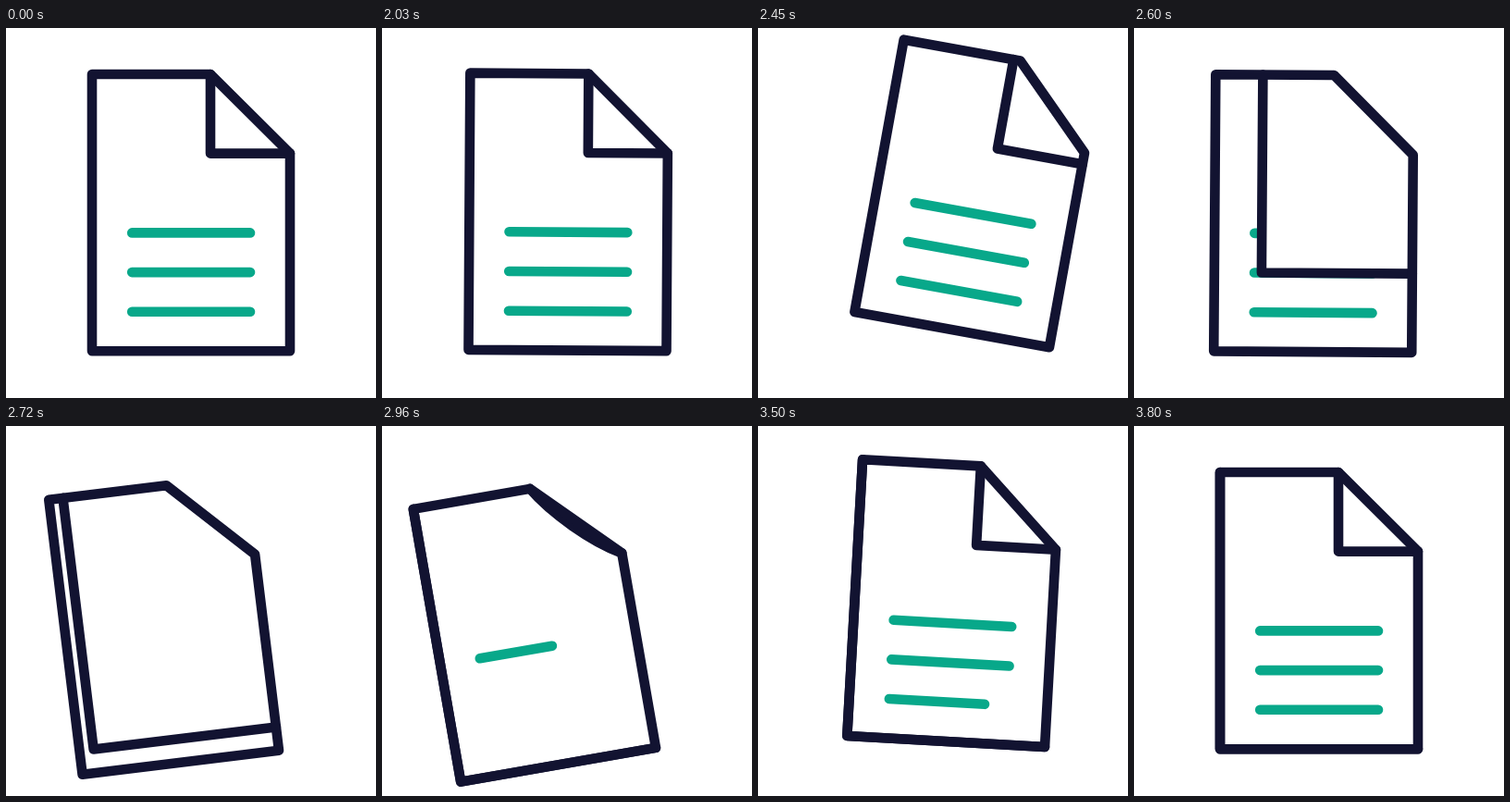
An HTML page with a canvas for the animation above (3.89 s loop, 400 by 400 pixels).

```html
<!DOCTYPE html>
<html lang="en">
<head>
<meta charset="utf-8">
<title>Document</title>
<style>
  html, body { margin: 0; width: 100%; height: 100%; overflow: hidden; background: #fff; }
  canvas { display: block; width: 400px; height: 400px; }
</style>
</head>
<body>
<canvas id="stage"></canvas>
<script>
const LOOP = 3890, STEP = 30, MOVE_START = 2030;
const NAVY = '#121331', TEAL = '#08a88a';
const LEFT = 93, RIGHT = 307, TOP = 50, BOTTOM = 349.2;
const CUT_X = 221, CUT_Y = 135.6;
const LINES = [221.4, 264.1, 306.8], LINE_X = 136.2, LINE_W = 127.8;
const LINES_START = 2745, LINE_GAP = 220, LINE_TIME = 560;

const canvas = document.getElementById('stage');
const ratio = window.devicePixelRatio || 1;
canvas.width = canvas.height = 400 * ratio;
const ctx = canvas.getContext('2d');

const mix = (a, b, u) => a + (b - a) * u;
const span = (t, start, length) => Math.min(1, Math.max(0, (t - start) / length));
const smooth = u => u * u * (3 - 2 * u);
const easeOut = u => 1 - (1 - u) ** 2;

// cubic-bezier(.3, 0, .3, 1)
function snap(x) {
  let lo = 0, hi = 1;
  for (let i = 0; i < 24; i++) {
    const s = (lo + hi) / 2;
    if (0.9 * s * (1 - s) + s ** 3 < x) lo = s; else hi = s;
  }
  return smooth(lo);
}

// Swing out, back past the middle, small overshoot, settle
const EASES = [snap, snap, smooth, smooth];
function track(t, times, values) {
  let i = 0;
  while (i < 3 && t >= times[i + 1]) i++;
  const u = span(t, times[i], times[i + 1] - times[i]);
  return mix(values[i], values[i + 1], EASES[i](u));
}

function stroke(color, path) {
  ctx.strokeStyle = color;
  ctx.stroke(path);
}

function poly(points, closed) {
  const path = new Path2D();
  points.forEach(([x, y]) => path.lineTo(x, y));
  if (closed) path.closePath();
  return path;
}

function drawLines(progress) {
  LINES.forEach((y, i) => {
    const u = progress(i);
    if (u > 0) stroke(TEAL, poly([[LINE_X, y], [LINE_X + LINE_W * u, y]]));
  });
}

// The folded corner spreads until it covers the whole page
function drawTurn(u) {
  const x = mix(CUT_X, LEFT, u), y = mix(CUT_Y, BOTTOM, u);
  ctx.fillStyle = '#fff';
  ctx.fill(poly([[x, TOP], [CUT_X, TOP], [RIGHT, CUT_Y], [RIGHT, y], [x, y]], true));
  stroke(NAVY, poly([[x, TOP], [x, y], [RIGHT, y]]));
}

// A new corner bends inwards from the diagonal edge
function drawFold(u) {
  const x = mix((CUT_X + RIGHT) / 2, CUT_X, u);
  const y = mix((TOP + CUT_Y) / 2, CUT_Y, u);
  const bend = 28 * (1 - u);
  const path = new Path2D();
  path.moveTo(CUT_X, TOP);
  path.quadraticCurveTo(x - bend, y - bend, x, y);
  path.quadraticCurveTo(x + bend, y + bend, RIGHT, CUT_Y);
  stroke(NAVY, path);
}

function draw(t) {
  const x = track(t, [1990, 2415, 2890, 3380, 3800], [0, 38, -38, 14.4, 0]);
  const y = track(t, [1990, 2437, 2890, 3380, 3800], [0, -20.8, 21, -10, 0]);
  const angle = track(t, [1990, 2434, 2919, 3380, 3800], [0, 10.35, -10.2, 4, 0]);

  ctx.setTransform(ratio, 0, 0, ratio, 0, 0);
  ctx.fillStyle = '#fff';
  ctx.fillRect(0, 0, 400, 400);
  ctx.translate(200 + x, 199.6 + y);
  ctx.rotate(angle * Math.PI / 180);
  ctx.translate(-200, -199.6);
  ctx.lineWidth = 10.6;
  ctx.lineCap = ctx.lineJoin = 'round';

  const turn = snap(span(t, 2390, 520));
  if (t < LINES_START) drawLines(() => 1);
  if (turn < 1) drawTurn(turn);
  if (t >= LINES_START) {
    drawLines(i => easeOut(span(t, LINES_START + i * LINE_GAP, LINE_TIME)));
    drawFold(smooth(span(t, 2832, 625)));
  }
  stroke(NAVY, poly([[LEFT, TOP], [CUT_X, TOP], [RIGHT, CUT_Y], [RIGHT, BOTTOM], [LEFT, BOTTOM]], true));
}

const begin = performance.now();
function frame() {
  const t = (performance.now() - begin) % LOOP;
  const held = MOVE_START + Math.floor((t - MOVE_START) / STEP) * STEP;
  draw(t < MOVE_START ? 0 : held);
  requestAnimationFrame(frame);
}
frame();
</script>
</body>
</html>
```
